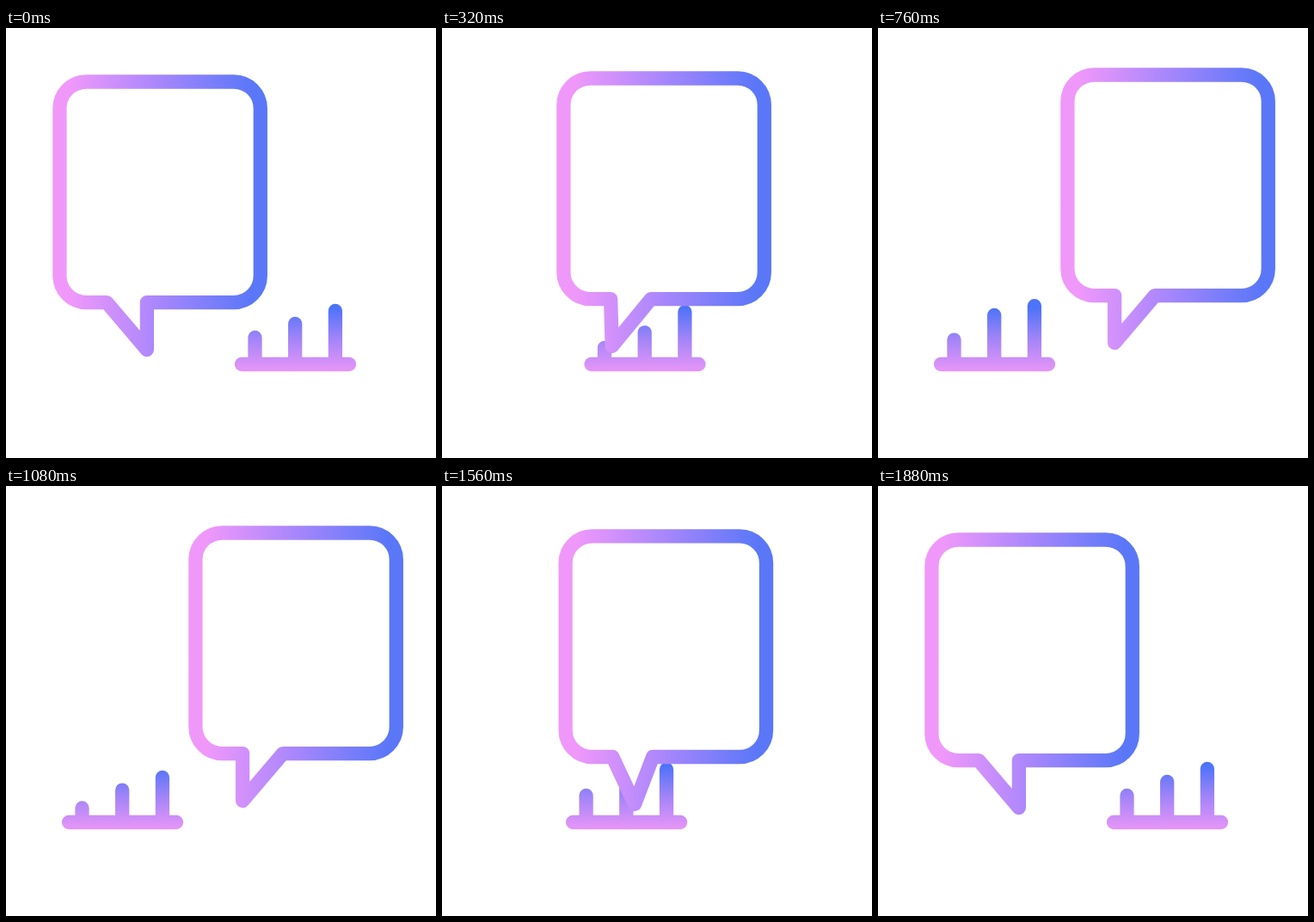
Recreate the animation shown at these times as an HTML page with a canvas. Size 500 by 500 pixels, loop 2 s.

```html
<!DOCTYPE html>
<html lang="en">
<head>
<meta charset="utf-8">
<title>Speech bubble and bar chart</title>
<style>
html, body { margin: 0; width: 100%; height: 100%; overflow: hidden; background: #fff; }
canvas { display: block; width: 500px; height: 500px; }
</style>
</head>
<body>
<canvas id="stage" width="500" height="500"></canvas>
<script>
const ctx = document.getElementById('stage').getContext('2d');
const LOOP = 2000, STEP = 40, START = 40;

// Eased progress from 0 to 1 between two times.
function ease(t, from, to) {
  const p = Math.min(1, Math.max(0, (t - from) / (to - from)));
  return p * p * (3 - 2 * p);
}

const mix = (a, b, p) => a + (b - a) * p;

// Goes from 0 to 1, holds, and returns to 0.
const thereAndBack = (t, arrive, leave, home) =>
  ease(t, START, arrive) - ease(t, leave, home);

// Each bar leaves its rest height, swings between two heights and settles.
const bars = [
  { rest: 352, ends: [371, 340.5], first: 200, gap: 380, turns: 3, settle: 1340 },
  { rest: 336, ends: [347, 326], first: 380, gap: 380, turns: 3, settle: 1440 },
  { rest: 321, ends: [315, 331], first: 180, gap: 300, turns: 4, settle: 1640 }
];

function barTop({ rest, ends, first, gap, turns, settle }, t) {
  let y = mix(rest, ends[0], ease(t, START, first));
  for (let i = 1; i < turns; i++) {
    const from = first + (i - 1) * gap;
    y = mix(y, ends[i % 2], ease(t, from, from + gap));
  }
  return mix(y, rest, ease(t, first + (turns - 1) * gap, settle));
}

function gradient(x0, y0, x1, y1, colors) {
  const g = ctx.createLinearGradient(x0, y0, x1, y1);
  colors.forEach((c, i) => g.addColorStop(i / (colors.length - 1), c));
  return g;
}

function line(x0, y0, x1, y1) {
  ctx.beginPath();
  ctx.moveTo(x0, y0);
  ctx.lineTo(x1, y1);
  ctx.stroke();
}

function drawChart(t) {
  const x = mix(274, 73, thereAndBack(t, 600, 1320, 1880)), base = 391;
  ctx.strokeStyle = gradient(0, 396, 0, 325, ['#e294f7', '#a084f8', '#4c73f8']);
  bars.forEach((bar, i) => {
    const bx = x + 15.5 + i * 46.7;
    line(bx, base, bx, barTop(bar, t) + 8);
  });
  line(x, base, x + 125, base);
}

function drawBubble(t) {
  const p = thereAndBack(t, 600, 1298, 1832);
  const w = 233.4, h = 256.6, r = 31, left = 54.7, right = 101.5;
  const tip = mix(right, left, thereAndBack(t, 355, 1320, 1770));
  ctx.save();
  ctx.translate(62.4 + 158 * p, 62.5 - 8 * p);
  ctx.strokeStyle = gradient(12, 0, 224, 0, ['#f098fa', '#a686fc', '#5a77f8']);
  ctx.beginPath();
  ctx.moveTo(right, h);
  ctx.arcTo(w, h, w, 0, r);
  ctx.arcTo(w, 0, 0, 0, r);
  ctx.arcTo(0, 0, 0, h, r);
  ctx.arcTo(0, h, w, h, r);
  ctx.lineTo(left, h);
  ctx.lineTo(tip, h + 55);
  ctx.closePath();
  ctx.fill();
  ctx.stroke();
  drawTicks(t);
  ctx.restore();
}

// Three short rays shoot out from a point inside the bubble.
function drawTicks(t) {
  const inner = mix(120, 143, ease(t, 600, 740));
  const outer = mix(120, 143, ease(t, 440, 600));
  if (outer <= inner) return;
  ctx.save();
  ctx.translate(74.4, 124);
  ctx.strokeStyle = gradient(90, 0, 150, 0, ['#e294f7', '#a686fc', '#5a77f8']);
  for (let i = 0; i < 3; i++) {
    const a = (-28 + 23.3 * i) * Math.PI / 180;
    const c = Math.cos(a), s = Math.sin(a);
    line(inner * c, inner * s, outer * c, outer * s);
  }
  ctx.restore();
}

function draw(now) {
  const t = Math.floor((now % LOOP) / STEP) * STEP;
  ctx.fillStyle = '#fff';
  ctx.fillRect(0, 0, 500, 500);
  ctx.lineWidth = 16.3;
  ctx.lineCap = ctx.lineJoin = 'round';
  drawChart(t);
  drawBubble(t);
}

let start = null;
function tick(now) {
  if (start === null) start = now;
  draw(now - start);
  requestAnimationFrame(tick);
}
draw(0);
requestAnimationFrame(tick);
</script>
</body>
</html>
```
